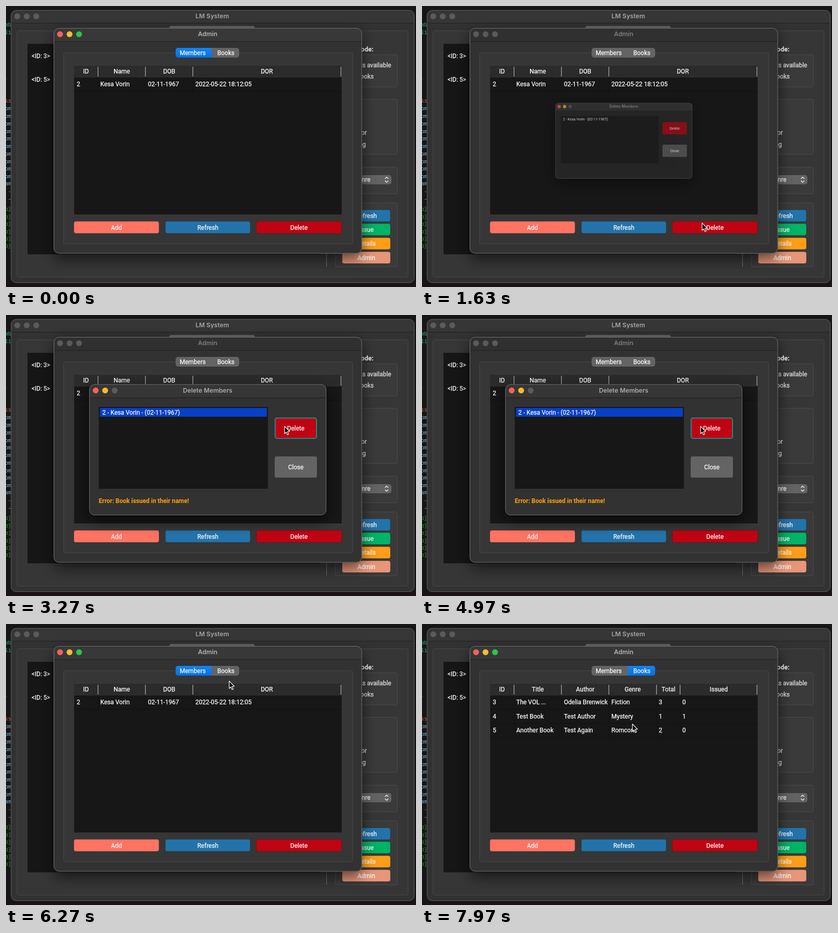
These frames come from a looping animation (800x550 px, 8000 ms). An HTML page with a canvas:

```html
<!DOCTYPE html>
<html lang="en">
<head>
<meta charset="utf-8">
<title>Library admin</title>
<style>
html, body { margin: 0; width: 100%; height: 100%; overflow: hidden; background: #161617; }
canvas { display: block; width: 100%; height: 100%; }
</style>
</head>
<body>
<canvas id="stage" width="800" height="550"></canvas>
<script>
const ctx = document.getElementById('stage').getContext('2d');
const LOOP = 8000;
const SANS = 'Roboto, sans-serif';
const MEMBER = 'Kesa Vorin';
const DOB = '02-11-1967';
const RED = '#c00312', BLUE = '#2373aa', DARK = '#171717';

// Event times in ms
const OPEN = 1600, SELECT = 2600, ERROR = 3230, CLOSE = 5700, BOOKS = 6570;

// Pointer stops: time, x, y
const PATH = [
  [30, 620, 552], [800, 562, 445], [1250, 546, 424], [1640, 546, 424],
  [1970, 394, 278], [2450, 300, 188], [2600, 300, 188], [3200, 543, 217],
  [4960, 543, 217], [5470, 544, 299], [5720, 544, 299], [6270, 435, 111],
  [6480, 429, 91], [6700, 429, 91], [7340, 398, 166], [7530, 399, 178],
  [7670, 399, 178], [7970, 410, 195]
];

const MEMBERS_TABLE = {
  seps: [179.5, 272, 364.5, 653.5],
  heads: [['ID', 156], ['Name', 226], ['DOB', 318.5], ['DOR', 509]],
  rows: [['2', MEMBER, DOB, '2022-05-22 18:12:05']]
};
const BOOKS_TABLE = {
  seps: [179.5, 272, 364.5, 457.5, 503.5, 653.5],
  heads: [['ID', 156], ['Title', 226], ['Author', 318.5], ['Genre', 411], ['Total', 481], ['Issued', 579]],
  rows: [
    ['3', 'The VOL ...', 'Odelia Brenwick', 'Fiction', '3', '0'],
    ['4', 'Test Book', 'Test Author', 'Mystery', '1', '1'],
    ['5', 'Another Book', 'Test Again', 'Romcom', '2', '0']
  ]
};
const CELL_X = [138, 184, 277, 369.5, 462, 508];

function rect(x, y, w, h, color) {
  ctx.fillStyle = color;
  ctx.fillRect(x, y, w, h);
}

function round(x, y, w, h, r, fill, stroke, width = 1) {
  ctx.beginPath();
  ctx.roundRect(x, y, w, h, r);
  if (fill) { ctx.fillStyle = fill; ctx.fill(); }
  if (stroke) { ctx.strokeStyle = stroke; ctx.lineWidth = width; ctx.stroke(); }
}

// y is the middle of the capitals
function text(str, x, y, { align = 'left', color = '#fff', font = `12px ${SANS}`, weight = 0.25 } = {}) {
  ctx.font = font;
  ctx.textAlign = align;
  ctx.fillStyle = color;
  ctx.fillText(str, x, y + 4.3);
  if (weight) {
    ctx.strokeStyle = color;
    ctx.lineWidth = weight;
    ctx.strokeText(str, x, y + 4.3);
  }
}

function label(str, x, y, color) {
  text(str, x, y, { align: 'center', color });
}

function button(str, x, y, w, h, color, ring) {
  round(x, y, w, h, 4, color, 'rgba(0,0,0,.18)');
  if (ring) round(x + 1, y + 1, w - 2, h - 2, 4, null, '#16908e', 2);
  label(str, x + w / 2, y + h / 2);
}

function lights(x, y, colors, step = 18.5) {
  colors.forEach((color, i) => {
    ctx.beginPath();
    ctx.arc(x + i * step, y, 5.7, 0, Math.PI * 2);
    ctx.fillStyle = color;
    ctx.fill();
  });
}

function frame(x, y, w, h, { bar, title, titleX, titleColor, barColor, bg, border, dots, shadow }) {
  ctx.save();
  if (shadow) {
    ctx.shadowColor = 'rgba(0,0,0,.6)';
    ctx.shadowBlur = 28;
    ctx.shadowOffsetY = 10;
  }
  round(x, y, w, h, 10, bg);
  ctx.restore();
  ctx.save();
  ctx.beginPath();
  ctx.roundRect(x, y, w, h, 10);
  ctx.clip();
  rect(x, y, w, bar, barColor);
  rect(x, y + bar, w, 1, '#1f1f1f');
  ctx.restore();
  round(x + 0.5, y + 0.5, w - 1, h - 1, 10, null, border);
  lights(x + 12.5, y + 12.3, dots);
  text(title, titleX, y + 12, {
    align: 'center', color: titleColor, font: '600 12.2px Inter, sans-serif', weight: 0
  });
}

function code() {
  const line = (str, y, color) => text(str, -2, y, { color, font: '10px "Noto Sans Mono", monospace', weight: 0 });
  line('ab', 36, '#22b573');
  line('li', 51, '#22b573');
  line('.', 139, '#1d7a3c');
  line('ss', 185, '#d0653f');
  for (let i = 0; i < 10; i++) line('om', 200 + i * 14.75, '#78b4d8');
  line('am', 347, '#78b4d8');
  line(' -', 362, '#777');
  line(' -', 377, '#aaa');
  for (let i = 0; i < 6; i++) line('o]', 397 + i * 14.4, '#27a822');
}

function mainWindow() {
  rect(0, 0, 800, 550, '#161617');
  rect(0, 543, 800, 7, '#1a1216');
  code();
  frame(9.5, 8, 787.5, 534, {
    bar: 25, title: 'LM System', titleX: 402.5, titleColor: '#a6a6a6',
    barColor: '#363636', bg: '#323232', border: '#606060', dots: Array(3).fill('#5b5b5b')
  });
  round(21.5, 48.5, 763, 482, 3, '#363636', '#484848');
  round(318, 39, 168, 19, 5, '#656565');
  rect(42, 74, 572, 412, '#161616');
  text('<ID: 3>', 50, 98);
  text('<ID: 5>', 50, 144);
  rect(625, 74, 1, 436, '#777');

  text('Mode:', 717, 85, { align: 'right', font: `bold 12.5px ${SANS}`, weight: 0 });
  for (const [y, h] of [[95, 63], [182, 108], [315, 52], [385, 125]])
    round(642.5, y + 0.5, 121, h, 3, '#3a3a3a', '#4a4a4a');
  const option = (str, right, y) => text(str, right, y, { align: 'right', color: '#e6e6e6' });
  option('Books available', 751.5, 116);
  option('All books', 717.5, 138);
  option('Author', 704, 248);
  option('Tag', 702, 271);

  round(656, 331, 96, 18, 4.5, '#636363');
  text('Genre', 711, 340, { align: 'right' });
  ctx.strokeStyle = '#f0f0f0';
  ctx.lineWidth = 1.4;
  for (const dir of [-1, 1]) {
    ctx.beginPath();
    ctx.moveTo(739.5, 340 + dir * 2);
    ctx.lineTo(742.8, 340 + dir * 5);
    ctx.lineTo(746, 340 + dir * 2);
    ctx.stroke();
  }
  button('Refresh', 656, 399, 94, 23, BLUE);
  button('Issue', 656, 426, 94, 23, '#00b466');
  button('Details', 656, 453.5, 94, 23, '#ff9d18');
  button('Admin', 656, 481, 94, 23, '#e79679');
}

function table({ seps, heads, rows }) {
  rect(133, 117, 522, 291, DARK);
  rect(133, 117, 522, 23, '#2b2b2b');
  for (const x of seps) rect(x - 0.6, 119, 1.3, 19, '#a8a8a8');
  for (const [str, x] of heads) label(str, x, 128);
  rows.forEach((row, r) => {
    const y = 152.5 + r * 27.7;
    rect(133, y + 14, 522, 1, '#121212');
    for (const x of seps.slice(0, -1)) rect(x, y - 12, 1, 27, '#121212');
    row.forEach((cell, i) => text(cell, CELL_X[i], y));
  });
}

function adminWindow(active, books) {
  const gray = '#5a5a5a';
  frame(93, 43, 601.5, 441.5, {
    bar: 26, title: 'Admin', titleX: 393.5, titleColor: active ? '#b4b4b4' : '#7d7d7d',
    barColor: active ? '#383838' : '#303030', bg: '#323232', border: '#707070', shadow: true,
    dots: active ? ['#fe5f57', '#febc2e', '#28c840'] : [gray, gray, gray]
  });
  round(112.5, 91.5, 564, 374, 3, '#363636', '#474747');
  round(331, 82, 124, 19, 5, '#646464');
  if (active) {
    const blue = ctx.createLinearGradient(0, 82, 0, 101);
    blue.addColorStop(0, '#1583f3');
    blue.addColorStop(1, '#0371e2');
    if (books) round(401.5, 82, 53.5, 19, [0, 5, 5, 0], blue);
    else round(331, 82, 70.5, 19, [5, 0, 0, 5], blue);
  }
  label('Members', 364.3, 91.3);
  label('Books', 429, 91.3);
  table(books ? BOOKS_TABLE : MEMBERS_TABLE);
  button('Add', 132.5, 421.5, 166, 23.5, '#ff7362');
  button('Refresh', 311, 421.5, 165.5, 23.5, BLUE);
  button('Delete', 488.5, 421.5, 166.5, 23.5, RED);
}

function dialog(t, pointer) {
  const p = Math.min(1, (t - OPEN) / 200);
  const scale = 0.5 + 0.5 * p;
  const over = (x, y, w, h) => p === 1 && pointer.x > x && pointer.x < x + w && pointer.y > y && pointer.y < y + h;
  ctx.save();
  ctx.globalAlpha = 0.55 + 0.45 * p;
  ctx.translate(394, 264);
  ctx.scale(scale, scale);
  ctx.translate(-394, -264);
  frame(162.5, 135.5, 462.5, 256.5, {
    bar: 26, title: 'Delete Members', titleX: 393.5, titleColor: '#ababab',
    barColor: '#363636', bg: '#323232', border: '#6c6c6c', shadow: true,
    dots: ['#fe5f57', '#f6bb2c', '#5c5c5c']
  });
  rect(181, 180, 330, 160, DARK);
  if (t >= SELECT) rect(183.5, 182, 325.5, 17, '#0740c8');
  text(`2 - ${MEMBER} - (${DOB})`, 188, 190.3);
  button('Delete', 524, 200.5, 83, 42, RED, over(524, 200, 83, 42));
  button('Close', 524, 276.5, 83, 42, '#646464', over(524, 276, 83, 42));
  if (t >= ERROR)
    text('Error: Book issued in their name!', 181, 364, { color: '#ffa20a', font: `bold 12px ${SANS}`, weight: 0 });
  ctx.restore();
}

function pointerAt(t) {
  if (t < PATH[0][0]) return { x: 620, y: 560 };
  const i = PATH.findIndex(k => k[0] > t);
  if (i < 0) return { x: 410, y: 195 };
  const [t0, x0, y0] = PATH[i - 1], [t1, x1, y1] = PATH[i];
  const p = (t - t0) / (t1 - t0);
  const e = p * p * (3 - 2 * p);
  return { x: x0 + (x1 - x0) * e, y: y0 + (y1 - y0) * e };
}

function cursor({ x, y }) {
  ctx.save();
  ctx.translate(x + 0.5, y + 0.7);
  ctx.beginPath();
  for (const [px, py] of [[0, 0], [0, 14.5], [3.3, 11.4], [5.6, 16.7], [8, 15.7], [5.7, 10.5], [10, 10.3]])
    ctx.lineTo(px, py);
  ctx.closePath();
  ctx.lineJoin = 'round';
  ctx.fillStyle = '#0a0a0a';
  ctx.strokeStyle = '#f2f2f2';
  ctx.lineWidth = 1.2;
  ctx.fill();
  ctx.stroke();
  ctx.restore();
}

const start = performance.now();

function draw() {
  const t = (performance.now() - start) % LOOP;
  const pointer = pointerAt(t);
  const open = t >= OPEN && t < CLOSE;
  mainWindow();
  adminWindow(!open, t >= BOOKS);
  if (open) dialog(t, pointer);
  cursor(pointer);
  requestAnimationFrame(draw);
}
draw();
</script>
</body>
</html>
```
